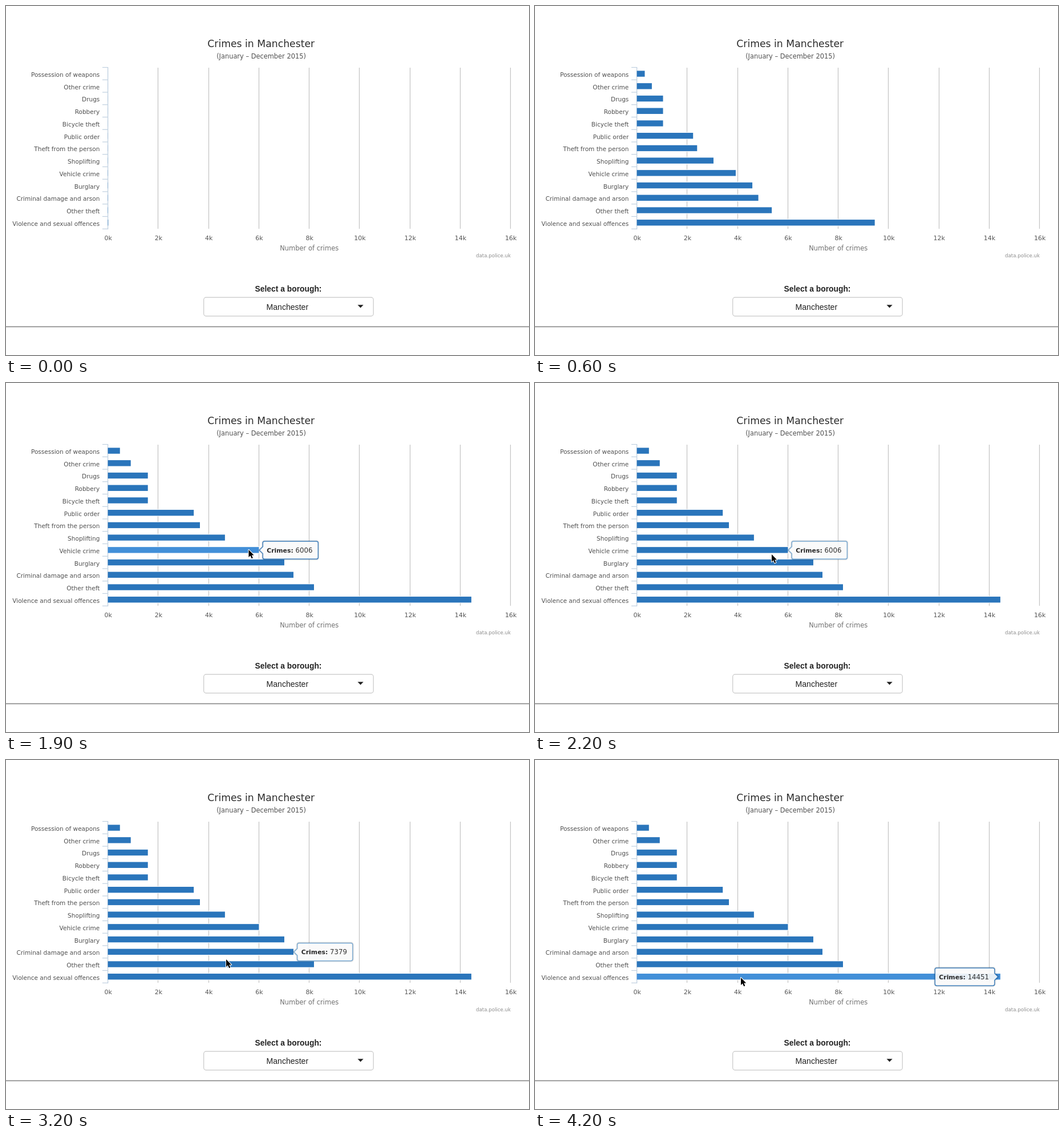
An HTML page with a canvas for the animation above (4.3 s loop, 917 by 611 pixels).

```html
<!DOCTYPE html>
<html lang="en">
<head>
<meta charset="utf-8">
<title>Crimes in Manchester</title>
<style>
  html, body { margin: 0; width: 100%; height: 100%; overflow: hidden; background: #fff; }
  canvas { display: block; width: 917px; height: 611px; }
</style>
</head>
<body>
<canvas id="stage" width="917" height="611"></canvas>
<script>
const ctx = document.getElementById('stage').getContext('2d');
const LOOP = 4300, STEP = 100;
const LEFT = 178.6, TOP = 107.5, PITCH = 21.75, PER_CRIME = 0.0441, BAR_H = 10.4;
const BLUE = '#2a75bb', HOVER_BLUE = '#428fd8';
const SANS = '"DejaVu Sans", sans-serif', ARIAL = '"Liberation Sans", Arial, sans-serif';

const rows = [
  ['Possession of weapons', 480], ['Other crime', 910], ['Drugs', 1590],
  ['Robbery', 1590], ['Bicycle theft', 1590], ['Public order', 3415],
  ['Theft from the person', 3660], ['Shoplifting', 4655], ['Vehicle crime', 6006],
  ['Burglary', 7015], ['Criminal damage and arson', 7379], ['Other theft', 8195],
  ['Violence and sexual offences', 14451]
];

// Pointer path: time, x, y
const path = [
  [1300, 455, 245], [1800, 426, 290], [1900, 425.5, 292], [2200, 415, 300],
  [2400, 400, 316], [2600, 390, 339], [3100, 387, 341], [3200, 386, 349],
  [3400, 381, 357], [3560, 370, 374.5], [4200, 361, 381]
];

// Tooltip moves: start time, row
const moves = [[1770, 8], [2300, 9], [2550, 10], [3310, 11], [3560, 12]];

const lerp = (a, b, p) => a + (b - a) * p;
const barTop = i => 113.4 + i * 21.72;
const barEnd = i => LEFT + rows[i][1] * PER_CRIME;

function text(str, x, y, size, color, align = 'left', family = SANS, weight = '') {
  ctx.font = `${weight} ${size}px ${family}`;
  ctx.textAlign = align;
  ctx.fillStyle = color;
  ctx.fillText(str, x, y);
}

function line(x1, y1, x2, y2, color, width = 1) {
  ctx.strokeStyle = color;
  ctx.lineWidth = width;
  ctx.beginPath();
  ctx.moveTo(x1, y1);
  ctx.lineTo(x2, y2);
  ctx.stroke();
}

function polygon(points) {
  ctx.beginPath();
  points.forEach(([x, y]) => ctx.lineTo(x, y));
  ctx.closePath();
}

function pointerAt(t) {
  if (t < path[0][0]) return null;
  const next = path.findIndex(k => k[0] > t);
  if (next < 0) return path.at(-1).slice(1);
  const [t0, x0, y0] = path[next - 1], [t1, x1, y1] = path[next];
  const p = (t - t0) / (t1 - t0);
  return [lerp(x0, x1, p), lerp(y0, y1, p)];
}

function rowUnder(point) {
  if (!point) return -1;
  const [x, y] = point;
  return rows.findIndex((_, i) =>
    x < barEnd(i) && y >= barTop(i) && y <= barTop(i) + BAR_H);
}

function drawAxes() {
  for (let i = 0; i <= 8; i++) {
    const x = LEFT + i * 88.25;
    if (i) line(Math.floor(x) + 0.5, 108, Math.floor(x) + 0.5, 390, '#c2c2c2', 1.2);
    text(`${i * 2}k`, x + 0.5, 410, 11, '#555', 'center');
  }
  line(LEFT, TOP - 0.5, LEFT, 391, '#c0d0e0', 1.3);
  rows.forEach(([label], i) => {
    line(169, TOP + i * PITCH, LEFT, TOP + i * PITCH, '#c0d0e0', 1.2);
    text(label, 164.3, 123.9 + i * PITCH, 10.53, '#505050', 'right');
  });
  line(169, 390.3, LEFT, 390.3, '#c0d0e0', 1.2);
}

function drawBars(t, hovered) {
  const p = Math.min(t / 1000, 1);
  const grow = Math.max(0.001, 0.5 - Math.cos(Math.PI * p) / 2);
  rows.forEach(([, value], i) => {
    const w = value * PER_CRIME * grow, y = barTop(i);
    if (w > 2) {
      ctx.fillStyle = '#fff';
      ctx.fillRect(LEFT + 1, y - 1, w, BAR_H + 2);
    }
    ctx.fillStyle = i === hovered ? HOVER_BLUE : BLUE;
    ctx.fillRect(LEFT, y, w, BAR_H);
  });
}

function tooltipBox(row) {
  const w = row === 12 ? 104.5 : 97;
  const x = row === 12 ? barEnd(row) - 114.5 : barEnd(row) + 6.8;
  return { x, y: barTop(row) - 10, w };
}

function drawTooltip(t, hovered) {
  const n = moves.findLastIndex(m => m[0] <= t);
  if (n < 0) return;
  const [start, row] = moves[n];
  const to = tooltipBox(row), from = tooltipBox(moves[Math.max(0, n - 1)][1]);
  const p = n ? 1 - Math.pow(2 / 3, (t - start) / 32) : 1;
  const x = lerp(from.x, to.x, p), y = lerp(from.y, to.y, p);
  const r = x + to.w, b = y + 31, mid = y + 15.5;
  const flip = row === 12 && p > 0.9;

  ctx.beginPath();
  ctx.moveTo(x + 3, y);
  ctx.arcTo(r, y, r, b, 3);
  if (flip) {
    ctx.lineTo(r, mid - 6);
    ctx.lineTo(r + 6, mid);
    ctx.lineTo(r, mid + 6);
  }
  ctx.arcTo(r, b, x, b, 3);
  ctx.arcTo(x, b, x, y, 3);
  if (!flip) {
    ctx.lineTo(x, mid + 6);
    ctx.lineTo(x - 6, mid);
    ctx.lineTo(x, mid - 6);
  }
  ctx.arcTo(x, y, r, y, 3);
  ctx.closePath();

  ctx.save();
  ctx.translate(1, 1);
  ctx.lineJoin = 'round';
  for (const width of [4, 2.5]) {
    ctx.lineWidth = width;
    ctx.strokeStyle = 'rgba(0,0,0,0.1)';
    ctx.stroke();
  }
  ctx.restore();
  ctx.fillStyle = 'rgba(250,250,250,0.9)';
  ctx.fill();
  ctx.lineWidth = 1.2;
  ctx.strokeStyle = hovered < 0 ? '#6ea6d6' : BLUE;
  ctx.stroke();

  text('Crimes:', x + 7, y + 19.5, 10.85, '#282828', 'left', SANS, 'bold');
  text(rows[row][1], x + 57.3, y + 19.5, 11.75, '#333');
}

function drawPointer([x, y]) {
  polygon([[0, 0], [0, 13], [3, 10.3], [5.2, 15.3], [7.4, 14.3], [5.2, 9.5], [9.2, 9.5]]
    .map(([dx, dy]) => [x + dx, y + dy]));
  ctx.lineJoin = 'round';
  ctx.lineWidth = 2;
  ctx.strokeStyle = '#fff';
  ctx.stroke();
  ctx.fillStyle = '#000';
  ctx.fill();
}

function drawSelect() {
  text('Select a borough:', 495, 499.5, 13.85, '#222', 'center', ARIAL, 'bold');
  ctx.beginPath();
  ctx.roundRect(346.7, 510.2, 297.5, 32.6, 4);
  ctx.lineWidth = 1.2;
  ctx.strokeStyle = '#c8c8c8';
  ctx.stroke();
  text('Manchester', 493.3, 531.5, 14.1, '#222', 'center', ARIAL);
  polygon([[616.5, 523.2], [626.7, 523.2], [621.6, 528.5]]);
  ctx.fillStyle = '#222';
  ctx.fill();
  line(0, 561.5, 917, 561.5, '#808080', 1.3);
}

function draw(t) {
  const pointer = pointerAt(t), hovered = rowUnder(pointer);
  ctx.fillStyle = '#fff';
  ctx.fillRect(0, 0, 917, 611);
  text('Crimes in Manchester', 447.2, 71.6, 17.26, '#2c2c2c', 'center');
  text('(January – December 2015)', 447.5, 92.4, 11.4, '#505050', 'center');
  drawAxes();
  drawBars(t, hovered);
  text('Number of crimes', 531.7, 427.6, 11.5, '#707070', 'center');
  text('data.police.uk', 885, 439.6, 8.65, '#8c8c8c', 'right');
  drawSelect();
  drawTooltip(t, hovered);
  if (pointer) drawPointer(pointer);
}

const begin = performance.now();
function frame() {
  const t = (performance.now() - begin) % LOOP;
  draw(Math.floor(t / STEP) * STEP);
  requestAnimationFrame(frame);
}
frame();
</script>
</body>
</html>
```
